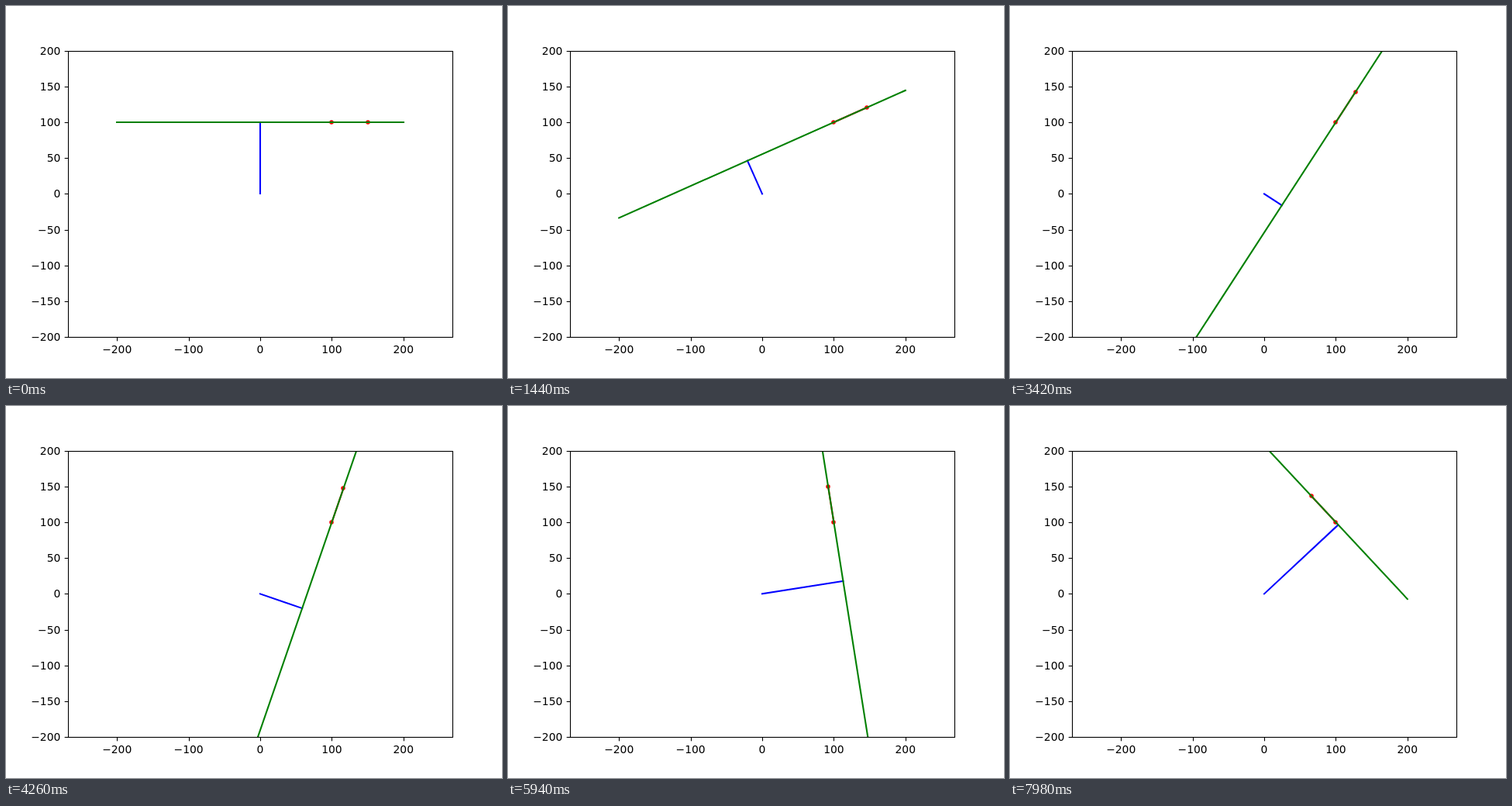
Recreate the animation shown at these times as an HTML page. Size 640 px wide and 480 px high, loop 8 s.

```html
<!DOCTYPE html>
<html lang="en">
<head>
<meta charset="utf-8">
<title>Distance to a turning line</title>
<style>
  html, body { margin: 0; width: 100%; height: 100%; overflow: hidden; background: #fff; }
  svg { display: block; width: 640px; height: 480px; }
  text { font: 13.889px "DejaVu Sans", sans-serif; }
  .axes { fill: none; stroke: #000; stroke-width: 1.11; }
  .line { fill: none; stroke-width: 2.083; stroke-linecap: square; }
</style>
</head>
<body>
<svg viewBox="0 0 640 480">
  <clipPath id="plot"><rect x="80" y="58" width="496" height="369"/></clipPath>
  <g clip-path="url(#plot)">
    <path id="normal" class="line" stroke="#00f"/>
    <path id="arm" class="line" stroke="#f00"/>
    <circle id="pivot" r="2.78" fill="#f00"/>
    <circle id="tip" r="2.78" fill="#f00"/>
    <path id="ray" class="line" stroke="#008000"/>
  </g>
  <g id="axes"><rect class="axes" x="80.5" y="58.5" width="496" height="369"/></g>
</svg>
<script>
const LOOP = 8000, STEP = 60, SCALE = 0.924;
const PIVOT = [100, 100], ARM = 50, REACH = 200;
const byId = id => document.getElementById(id);
const toScreen = ([x, y]) => [328 + x * SCALE, 242.4 - y * SCALE];

function add(tag, attrs, text = '') {
  const node = document.createElementNS('http://www.w3.org/2000/svg', tag);
  for (const key in attrs) node.setAttribute(key, attrs[key]);
  node.textContent = text;
  byId('axes').append(node);
}

function drawTicks() {
  const label = v => String(v).replace('-', '\u2212');
  const crisp = v => Math.round(v) + 0.5;
  for (let v = -200; v <= 200; v += 50) {
    const [x, y] = toScreen([v, v]).map(crisp);
    add('path', { class: 'axes', d: `M80.5 ${y}h-4.86` });
    add('text', { x: 70.3, y: y + 4.5, 'text-anchor': 'end' }, label(v));
    if (v % 100) continue;
    add('path', { class: 'axes', d: `M${x} 427.5v4.86` });
    add('text', { x: toScreen([v, 0])[0], y: 448, 'text-anchor': 'middle' }, label(v));
  }
}

function setLine(id, from, to) {
  let ends = [toScreen(from), toScreen(to)];
  const [[x1, y1], [x2, y2]] = ends;
  // Upright and level lines sit on whole pixels.
  if (Math.abs(x1 - x2) < 1e-6 || Math.abs(y1 - y2) < 1e-6)
    ends = ends.map(p => p.map(Math.round));
  byId(id).setAttribute('d', `M${ends[0]}L${ends[1]}`);
}

function setDot(id, point) {
  const [x, y] = toScreen(point).map(Math.round);
  byId(id).setAttribute('cx', x);
  byId(id).setAttribute('cy', y);
}

function draw(degrees) {
  const angle = degrees * Math.PI / 180;
  const [px, py] = PIVOT;
  const tip = [px + ARM * Math.cos(angle), py + ARM * Math.sin(angle)];
  // An upright arm has no slope, so its line falls back to level.
  const slope = degrees === 90 ? 0 : Math.tan(angle);
  const offset = py - slope * px;
  const footY = offset / (1 + slope * slope);

  setLine('normal', [0, 0], [-slope * footY, footY]);
  setLine('arm', PIVOT, tip);
  setLine('ray', [-REACH, offset - slope * REACH], [REACH, offset + slope * REACH]);
  setDot('pivot', PIVOT);
  setDot('tip', tip);
}

function frame() {
  draw(Math.floor(performance.now() % LOOP / STEP));
  requestAnimationFrame(frame);
}

drawTicks();
frame();
</script>
</body>
</html>
```
